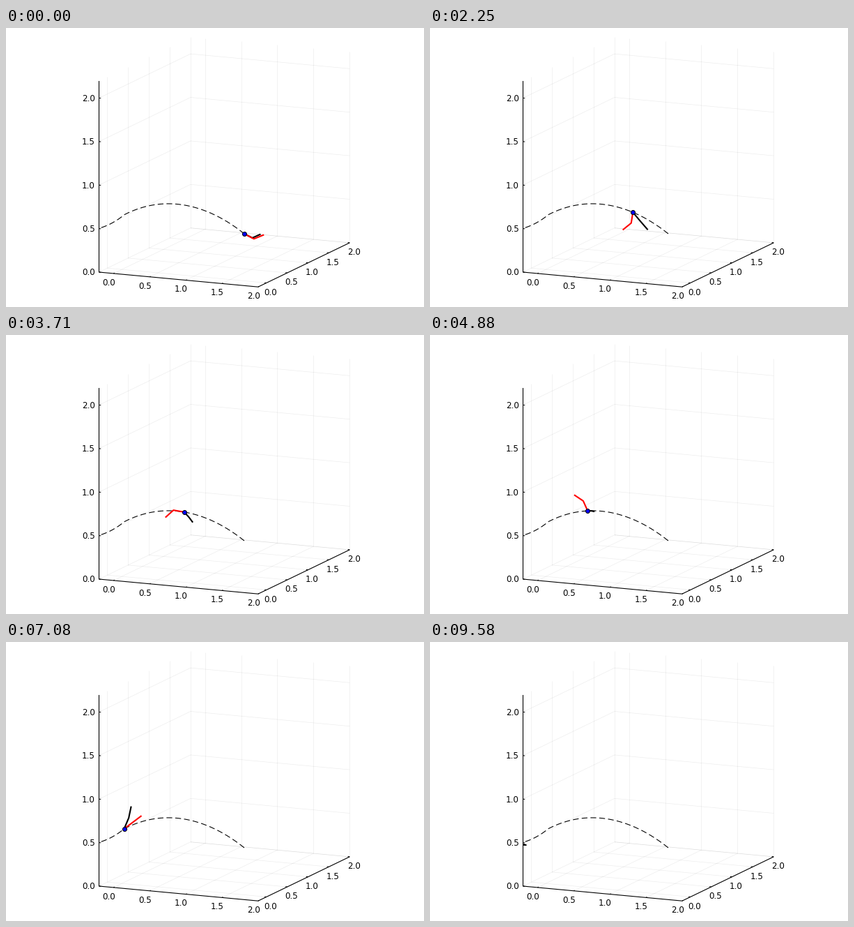
Recreate the animation shown at these times as a matplotlib script. Size 600x400 px, loop 9620 ms.

```python
import numpy as np
import matplotlib.pyplot as plt
from matplotlib.animation import FuncAnimation
from matplotlib.patches import Rectangle

W, H, DPI = 600, 400, 100
PX = 72 / DPI                    # points per pixel
LOOP, STEP, FPS = 9620, 20, 24   # ms, ms, pose updates per second

# Screen position of a 3D point: the box starts at -0.2, -0.2, 0
CORNER = np.array([133.5, 350.0])
EX = np.array([228.4, 21.2]) / 2.2
EY = np.array([131.4, -63.3]) / 2.2
EZ = np.array([0, -124.8])
LO, HI = -0.2, 2.0
TOP = 2.196

# The hub flies along one Bezier curve, then lands along a second one
TURN, END = 7.08, 9.58
FLIGHT = np.array([[342, 295], [292, 255], [230.5, 236.3], [169.6, 267.8]])
LANDING = np.array([[169.6, 267.8], [156.5, 278.8], [141.5, 286], [127.6, 288.5]])

# Link angles in degrees, clockwise on screen, at a few key times
KEYS = np.array([0, 2.25, 3.71, 4.88, 7.08, 8.58, 9.58])
BLACK_THIGH = np.array([27, 50, 47, 0, -67, -45, 14])
BLACK_SHIN = np.array([-24, 49, 53, 11, -78, -162, -174])
BLACK_LENGTH = np.array([13, 16.5, 9.7, 5, 17, 9.2, 10.5])
RED_THIGH = np.array([28, 99, 190, 246, 323, 420, 453])
RED_SHIN = np.array([-22, 141, 138, 214, 323, 336, 454])
RED_LENGTH = np.full(len(KEYS), 15.6)


def smooth(t, values):
    """Cubic Hermite curve through the values at the key times."""
    slopes = np.gradient(values, KEYS)
    i = int(np.clip(np.searchsorted(KEYS, t, "right") - 1, 0, len(KEYS) - 2))
    h = KEYS[i + 1] - KEYS[i]
    u = (t - KEYS[i]) / h
    return ((1 + 2 * u) * (1 - u) ** 2 * values[i]
            + u * u * (3 - 2 * u) * values[i + 1]
            + h * u * (1 - u) * ((1 - u) * slopes[i] - u * slopes[i + 1]))


def bezier(u, points):
    v = 1 - u
    return np.array([v ** 3, 3 * u * v * v, 3 * u * u * v, u ** 3]) @ points


def hub_at(t):
    if t < TURN:
        return bezier(t / TURN, FLIGHT)
    return bezier((t - TURN) / (END - TURN), LANDING)


def leg(t, thigh, shin, length):
    """Hub, knee and foot of one leg."""
    angles = np.radians([smooth(t, thigh), smooth(t, shin)])
    links = smooth(t, length) * np.column_stack([np.cos(angles), np.sin(angles)])
    return np.cumsum([hub_at(t), *links], axis=0)


def project(x, y, z):
    return CORNER + (x - LO) * EX + (y - LO) * EY + z * EZ


fig = plt.figure(figsize=(W / DPI, H / DPI), dpi=DPI, facecolor="white")
ax = fig.add_axes([0, 0, 1, 1])
ax.set(xlim=(0, W), ylim=(H, 0))
ax.axis("off")


def segment(points, width, **style):
    xs, ys = np.array(points).T
    return ax.plot(xs, ys, lw=width * PX, solid_capstyle="butt", **style)[0]


def grid(*corners):
    for a, b in zip(corners, corners[1:]):
        segment([project(*a), project(*b)], 0.7, color="black", alpha=0.07)


def label(value, x, y, align="center"):
    ax.text(x, y + 4.4, f"{value:.1f}", ha=align, va="baseline",
            family="DejaVu Sans", fontsize=8.6)


def tick(start, along):
    segment([start, start + 0.012 * (HI - LO) * along], 1, color="black")


for v in np.arange(5) / 2:
    grid((v, LO, 0), (v, HI, 0), (v, HI, TOP))
    grid((HI, v, 0), (LO, v, 0), (LO, v, TOP))
    grid((LO, LO, v), (LO, HI, v), (HI, HI, v))

    on_x, on_y, on_z = project(v, LO, 0), project(HI, v, 0), project(LO, LO, v)
    tick(on_x, EY)
    tick(on_y, -EX)
    tick(on_z, EX)
    label(v, on_x[0] - 6.8, on_x[1] + 12.5)
    label(v, on_y[0] + 6, on_y[1] + 13)
    label(v, on_z[0] - 5.5, on_z[1], "right")

segment([project(LO, LO, TOP), project(LO, LO, 0),
         project(HI, LO, 0), project(HI, HI, 0)], 1.1, color="black")

window = Rectangle((133, 0), 361, H, transform=ax.transData)
trail = segment([hub_at(t) for t in np.linspace(0, END, FPS * 10)], 1.1,
                color="black", dashes=(7.5, 4))
black = segment([(0, 0)], 2.1, color="black")
red = segment([(0, 0)], 2.1, color="red")
hub, = ax.plot([], [], "o", ms=6 * PX, mfc="blue", mec="black", mew=PX)
for line in (trail, black, red):
    line.set_clip_path(window)


def draw(i):
    t = int((i * STEP + STEP / 2) * FPS / 1000) / FPS
    black.set_data(*leg(t, BLACK_THIGH, BLACK_SHIN, BLACK_LENGTH).T)
    red.set_data(*leg(t, RED_THIGH, RED_SHIN, RED_LENGTH).T)
    x, y = hub_at(t)
    hub.set_data([x], [y])
    hub.set_visible(x >= CORNER[0])
    return black, red, hub


anim = FuncAnimation(fig, draw, frames=LOOP // STEP, interval=STEP,
                     repeat=True, repeat_delay=0, blit=False)
plt.show()
```
